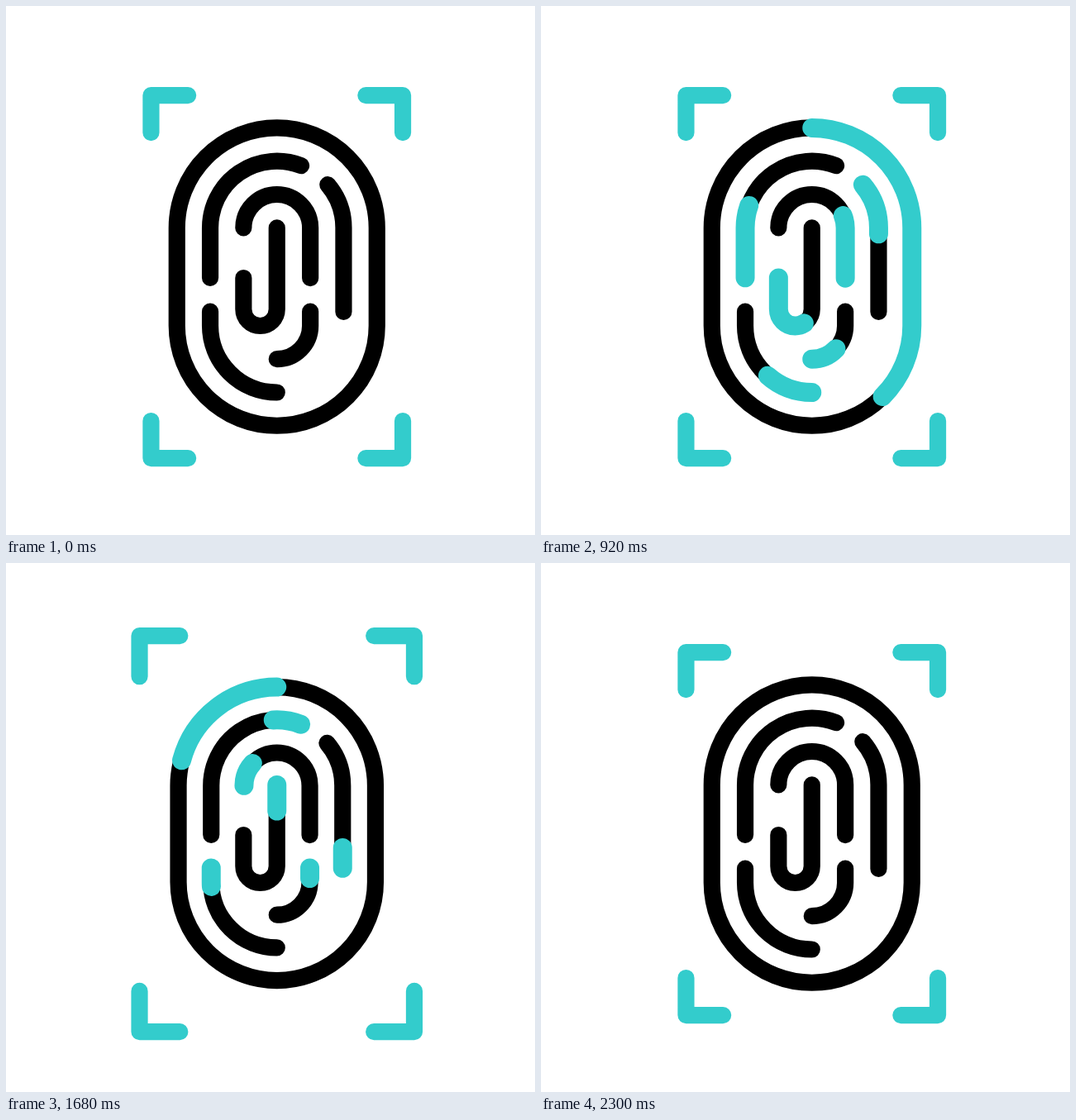
Write an HTML page that moves like this. It is 640 px wide and 640 px high and loops after 2400 ms.

```html
<!DOCTYPE html>
<html lang="en">
<head>
<meta charset="utf-8">
<title>Fingerprint scan</title>
<style>
  html, body { margin: 0; width: 100%; height: 100%; overflow: hidden; background: #fff; }
  svg { display: block; width: 100%; height: 100%; }
  path { fill: none; stroke-linecap: round; stroke-linejoin: round; }
</style>
</head>
<body>
<svg viewBox="0 0 640 640"><g id="stage" transform="translate(327.75 327.6)"></g></svg>
<script>
const LOOP = 2400, LINE = 20.2, SCAN_LINE = 23, TEAL = '#33cccc';

// Every ridge is drawn in the direction the scan light travels.
const CORE = 'M-40.4 1.4V39.2A20.2 20.2 0 0 0 0 39.2V-59.2';
const RIDGES = [
  'M0 -180.2A121 121 0 0 1 121 -59.2V59.2A121 121 0 0 1 -121 59.2V-59.2A121 121 0 0 1 0 -180.2',
  'M-80.7 1.2V-59.2A80.7 80.7 0 0 1 29.3 -134.4',
  'M61.6 -111.4A80.7 80.7 0 0 1 80.7 -59.2V42.3',
  'M40.4 1.6V-59.2A40.4 40.4 0 0 0 -40.4 -59.2',
  'M0 139.9A80.7 80.7 0 0 1 -80.7 59.2V42',
  'M0 99.6A40.4 40.4 0 0 0 40.4 59.2V42'
];
const CORNER = 'M-107.6 -219.5H-152.3V-174.4';

// Keyframes: [time in ms, value]
const PULSE = [[100, 1], [367, 1.05], [633, 1]];
const PRINT_SCALE = [...PULSE, [1600, 1], [1900, 0.917], [2133, 1.05], [2300, 1]];
const FRAME_SCALE = [[100, 1], [367, 0.95], [633, 1], [1500, 1], [1800, 1.14], [2000, 0.95], [2180, 1]];
const SCAN_HEAD = [[500, 0], [1465, 1]];
const SCAN_TAIL = [[1033, 0], [1900, 1]];

function add(parent, tag, attrs = {}) {
  const node = document.createElementNS('http://www.w3.org/2000/svg', tag);
  for (const name in attrs) node.setAttribute(name, attrs[name]);
  return parent.appendChild(node);
}

function valueAt(keys, t) {
  if (t <= keys[0][0]) return keys[0][1];
  for (let i = 1; i < keys.length; i++) {
    const [t0, a] = keys[i - 1], [t1, b] = keys[i];
    if (t < t1) {
      const u = (t - t0) / (t1 - t0);
      return a + (b - a) * u * u * (3 - 2 * u);
    }
  }
  return keys[keys.length - 1][1];
}

const stage = document.getElementById('stage');
const scans = [];

function addRidges(shapes) {
  const group = add(stage, 'g');
  const lines = add(group, 'g', { stroke: '#000' });
  const scan = add(group, 'g', { stroke: TEAL });
  for (const d of shapes) {
    add(lines, 'path', { d });
    add(scan, 'path', { d, pathLength: 1 });
  }
  scans.push(scan);
  return { group, lines, scan };
}

const print = addRidges(RIDGES);
const core = addRidges([CORE]);
const frame = add(stage, 'g', { stroke: TEAL });
for (const x of [1, -1]) {
  for (const y of [1, -1]) add(frame, 'path', { d: CORNER, transform: `scale(${x} ${y})` });
}

// Scales the shapes while line weights stay constant.
function resize(group, scale, ...weights) {
  group.setAttribute('transform', `scale(${scale})`);
  for (const [node, width] of weights) node.setAttribute('stroke-width', width / scale);
}

function resizeRidges({ group, lines, scan }, scale) {
  resize(group, scale, [lines, LINE], [scan, SCAN_LINE]);
}

function draw(now) {
  const t = now % LOOP;
  resizeRidges(print, valueAt(PRINT_SCALE, t));
  resizeRidges(core, valueAt(PULSE, t));
  resize(frame, valueAt(FRAME_SCALE, t), [frame, LINE]);

  const tail = valueAt(SCAN_TAIL, t), length = valueAt(SCAN_HEAD, t) - tail;
  for (const scan of scans) {
    scan.setAttribute('visibility', length > 0 ? 'visible' : 'hidden');
    scan.setAttribute('stroke-dasharray', `${length} 2`);
    scan.setAttribute('stroke-dashoffset', -tail);
  }
  requestAnimationFrame(draw);
}
draw(performance.now());
</script>
</body>
</html>
```
